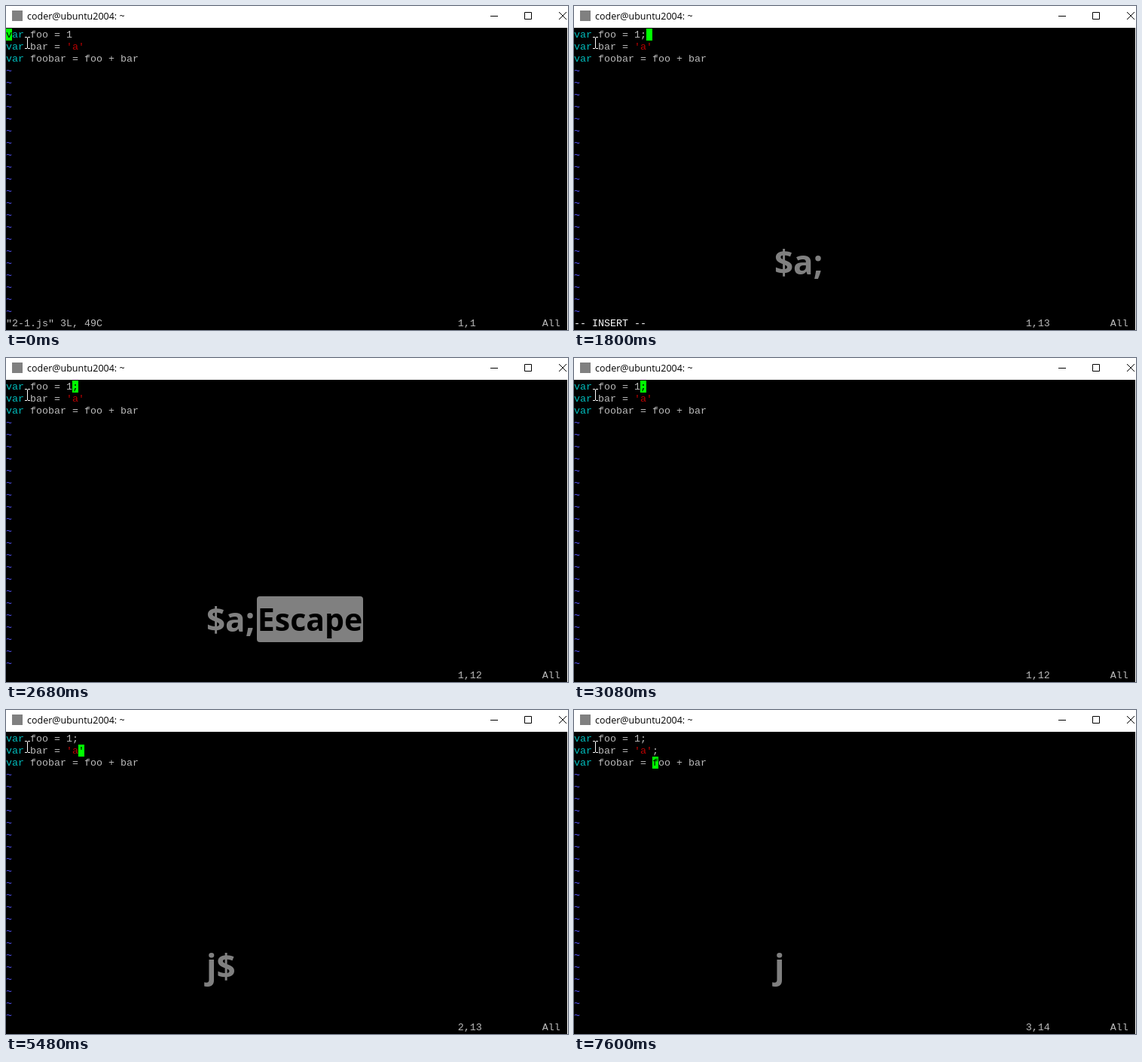
An HTML page that plays this animation: 746x431 px, repeating every 8 s.

```html
<!DOCTYPE html>
<html lang="en">
<head>
<meta charset="utf-8">
<title>Repeating an edit in Vim</title>
<style>
html, body { margin: 0; width: 100%; height: 100%; overflow: hidden; background: #000; }
body { position: relative; }
body > * { position: absolute; margin: 0; }
#bar { left: 0; top: 0; }
#term, #cursor { font: 13.333px/16px "Liberation Mono", monospace; white-space: pre; }
#term { left: 0; top: 31px; color: #bbb; }
#term b { font-weight: normal; color: #0bb; }
#term i { font-style: normal; color: #b00; }
#term u { text-decoration: none; color: #55f; }
#term em { font-style: normal; color: #fff; }
#cursor { width: 8px; height: 16px; line-height: 18px; background: #0f0; color: #000; }
#keys { left: 266px; font: bold 44px/60px "Open Sans", "Noto Sans", sans-serif; color: #808080; white-space: pre; }
#escape { left: 333px; top: 317px; width: 141px; height: 61px; border-radius: 4px; background: #808080;
  font: bold 41px/61px "Open Sans", "Noto Sans", sans-serif; color: #000; text-align: center; }
</style>
</head>
<body>
<pre id="term"></pre>
<div id="cursor"></div>
<svg id="bar" width="746" height="431">
  <path d="M0 0H746V431H745V29H0Z" fill="#fff"/>
  <rect x="8" y="6" width="14" height="14" fill="#808080"/>
  <text x="28" y="18" font-family="Open Sans, Noto Sans, sans-serif" font-size="12.5">coder@ubuntu2004: ~</text>
  <path d="M643 13.5h10M688.5 8.5h9v9h-9zM734 8l10 10M744 8l-10 10" fill="none" stroke="#000"/>
  <path d="M25 41.5h3m1 0h3M28.5 42v14M25 56.5h3m1 0h3" fill="none" stroke="#fff"/>
</svg>
<div id="keys"></div>
<div id="escape">Escape</div>
<script>
const LOOP = 8000;
const INSERT = '-- INSERT --';
const $ = id => document.getElementById(id);

// Each step changes part of the screen state from its time onwards.
const steps = [
  [0, { row: 0, col: 0, ends: ['', '', ''], left: '"2-1.js" 3L, 49C', ruler: '1,1', pending: '',
        keys: '', escape: false, fade: 1, cursor: true }],
  [500, { col: 10, ruler: '1,11', keys: '$' }],
  [1030, { col: 11, ruler: '1,12', keys: '$a', left: INSERT }],
  [1560, { keys: '$a;' }],
  [1680, { col: 12, ends: [';', '', ''] }],
  [1800, { ruler: '1,13' }],
  [2270, { keys: '' }],
  [2410, { keys: '$a;', escape: true }],
  [2530, { left: '', ruler: '', pending: '^[', cursor: false }],
  [2680, { col: 11, ruler: '1,12', pending: '', cursor: true }],
  [3080, { keys: '', escape: false }],
  [4740, { row: 1, ruler: '2,12', keys: 'j' }],
  [5360, { keys: 'j$' }],
  [5480, { col: 12, ruler: '2,13' }],
  [6030, { fade: 0.25 }],
  [6180, { keys: '', fade: 1 }],
  [6460, { col: 13, ends: [';', ';', ''], ruler: '2,14', keys: 'j$.' }],
  [6860, { fade: 0.75 }],
  [7010, { keys: '', fade: 1 }],
  [7600, { row: 2, ruler: '3,14', keys: 'j' }]
];
const code = ['var foo = 1', "var bar = 'a'", 'var foobar = foo + bar'];

const highlight = line => line.replace(/'.'/, '<i>$&</i>').replace(/^var/, '<b>$&</b>');

function render(s) {
  const lines = code.map((line, i) => line + s.ends[i]);
  const status = s.left.padEnd(64) + s.pending.padEnd(11) + s.ruler.padEnd(14) + (s.ruler && 'All');
  $('term').innerHTML = lines.map(highlight).join('\n') + '\n' + '<u>~</u>\n'.repeat(21) +
    status.replace(INSERT, '<em>$&</em>');

  $('cursor').textContent = lines[s.row][s.col] || ' ';
  $('cursor').style.left = s.col * 8 + 'px';
  $('cursor').style.top = 30 + s.row * 16 + 'px';
  $('cursor').hidden = !s.cursor;

  $('keys').textContent = s.keys;
  $('keys').style.top = (s.escape ? 317 : 310) + 'px';
  $('keys').style.opacity = s.fade;
  $('escape').hidden = !s.escape;
}

let shown = 0;
function frame() {
  const now = performance.now() % LOOP;
  const past = steps.filter(([time]) => time <= now);
  if (past.length !== shown) {
    shown = past.length;
    render(Object.assign({}, ...past.map(([, change]) => change)));
  }
  requestAnimationFrame(frame);
}
frame();
</script>
</body>
</html>
```
